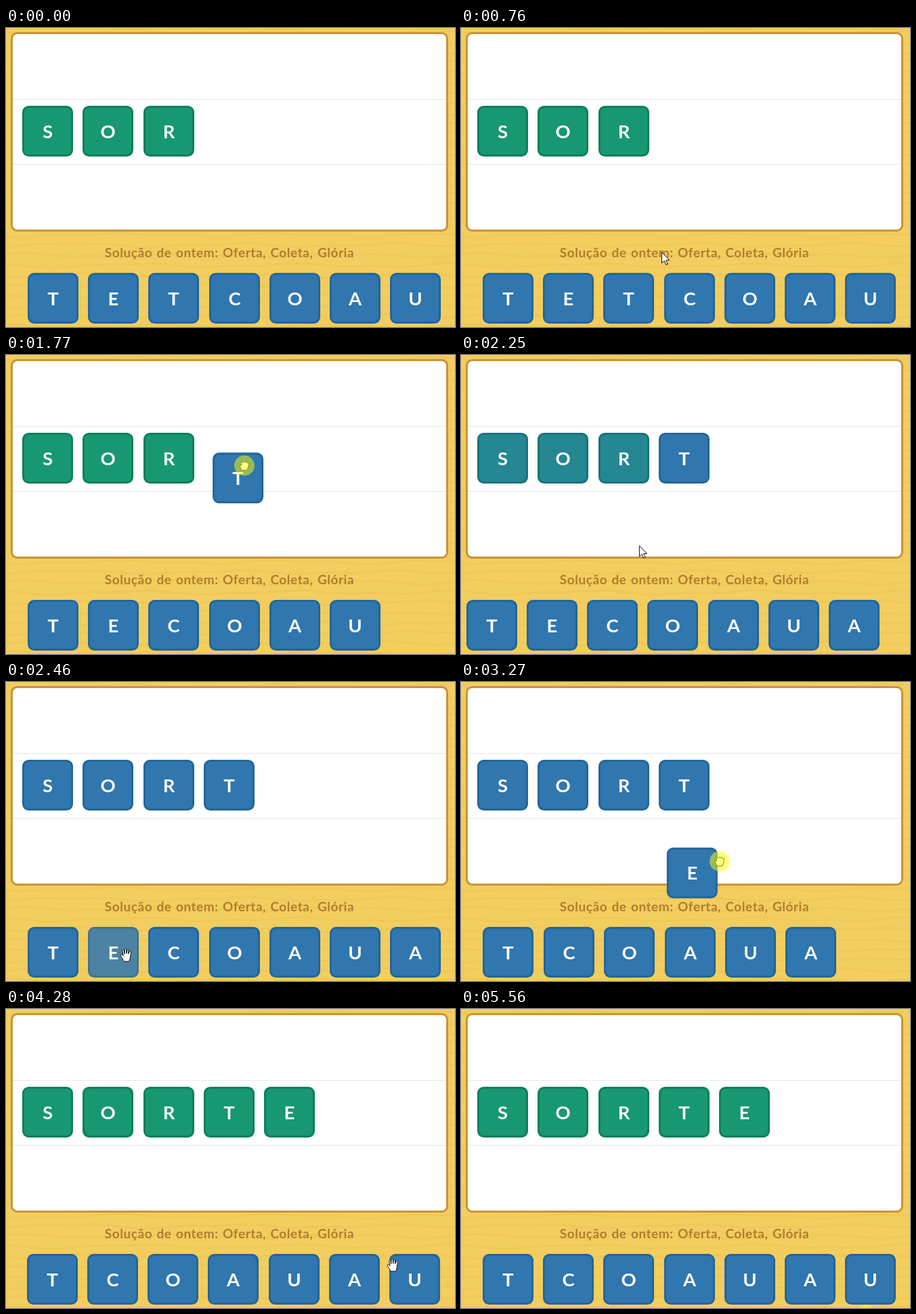
An HTML page that plays this animation: 663x442 px, repeating every 5.76 s.

```html
<!DOCTYPE html>
<html lang="pt">
<head>
<meta charset="utf-8">
<title>Jogo de palavras</title>
<style>
  html, body { margin: 0; width: 100%; height: 100%; overflow: hidden; background: #f2cd5f; }
  svg { display: block; width: 663px; height: 442px; }
  text { font-family: Lato, "Open Sans", sans-serif; font-weight: 700; text-anchor: middle; }
  .caption { font-size: 19px; letter-spacing: .55px; word-spacing: 1.2px; fill: #b17d2e; }
  .tile rect { stroke-width: 3; }
  .tile text { font-size: 27.5px; fill: #fff; }
  .grain path { fill: none; stroke: #edc455; stroke-width: 3; opacity: .5; }
  .cursor path { fill: #fff; stroke: #111; stroke-linejoin: round; }
</style>
</head>
<body>
<svg viewBox="0 0 663 442">
  <rect width="663" height="442" fill="#f2cd5f"/>
  <g id="grain" class="grain"></g>
  <rect x="8.5" y="7.5" width="643" height="292" rx="8" fill="#fff" stroke="#ca9337" stroke-width="3"/>
  <path d="M10 105.5H650M10 201.5H650" stroke="#e6e6e6"/>
  <text class="caption" x="330" y="338.5">Solução de ontem: Oferta, Coleta, Glória</text>
  <g id="tiles"></g>
  <g id="cursor" class="cursor">
    <path id="arrow" d="M.5 .5V16.5L4.2 13L6.8 19L9.2 18L6.7 12.2H11.7Z"/>
    <path id="open" d="M-4 9C-5 5-9 1.5-8.5-.5C-8-2-6-1-4.8 1L-6-6C-6-8-4-8-3.7-6L-3-2L-2.7-8C-2.6-10-.5-10-.4-8L-.2-2.5L.8-7.5C1.2-9.2 3-8.8 2.8-7L2.6-2L4.4-5.3C5.2-6.8 7-6 6.5-4.3L5.3 4L4 9Z"/>
    <path id="closed" d="M-4 7L-6 2.5C-8-1-5.5-2-4.5 0L-5-3C-5-6-2.5-6-2-4.5C-1.5-7 1-7 1.2-4.8C2-6.5 4-6 4.2-4C5.5-5 7-4 6.5-2L5 4L4 7Z"/>
    <circle id="press" r="15" fill="#ff0" fill-opacity=".5"/>
  </g>
</svg>
<script>
const LOOP = 5760, SIZE = 75, GAP = 89.25, PACE = 70;
const TRAY = { x: 31.9, y: 362 }, ROW = { x: 24, y: 115 };
const BLUE = [[48, 118, 175], [35, 102, 154]];
const GREEN = [[23, 152, 114], [14, 127, 92]];
const $ = id => document.getElementById(id);

const ramp = (t, start, length) => Math.min(1, Math.max(0, (t - start) / length));
const easeOut = (t, start, length) => 1 - (1 - ramp(t, start, length)) ** 2;
const mix = (a, b, k) => a + (b - a) * k;
const blend = (a, b, k) => `rgb(${a.map((v, i) => Math.round(mix(v, b[i], k)))})`;

// Pointer gestures: each curves from where the last one ended, bending towards `via`.
const rest = [598, 452];
const gestures = [
  { start: 200, end: 760, via: [480, 400], to: [296, 331] },
  { start: 830, end: 1170, via: [280, 360], to: [251, 393] },
  { start: 1500, end: 1770, via: [346, 172], to: [352, 163.5] },
  { start: 1900, end: 2060, via: [346, 157], to: [341, 152] },
  { start: 2120, end: 2460, via: [200, 390], to: [178, 404] },
  { start: 3060, end: 3270, via: [356, 303], to: [382, 265] },
  { start: 3330, end: 3620, via: [425, 215], to: [440, 186] },
  { start: 3690, end: 4200, via: [445, 110], to: [560, 355] },
  { start: 4280, end: 4770, via: [611, 457], to: rest }
];
gestures.forEach((g, i) => {
  const prev = gestures[i - 1] || { end: 0, to: rest };
  g.step = (g.end - g.start) / Math.round((g.end - g.start) / PACE);
  g.lead = Math.max(prev.end, g.start - g.step);
  g.from = prev.to;
});

// The picture refreshes in even steps within a gesture and rests in between.
function tick(t) {
  const g = gestures.findLast(g => g.start <= t);
  return g ? Math.min(g.end, g.start + Math.floor((t - g.start) / g.step + 1e-6) * g.step) : 0;
}

function pointer(t) {
  const g = gestures.findLast(g => g.lead < t);
  if (!g) return rest;
  const u = ramp(t, g.lead, g.end - g.lead);
  return g.to.map((end, i) => mix(mix(g.from[i], g.via[i], u), mix(g.via[i], end, u), u));
}

function svg(name, attrs, parent) {
  const el = document.createElementNS("http://www.w3.org/2000/svg", name);
  for (const key in attrs) el.setAttribute(key, attrs[key]);
  return parent.appendChild(el);
}

for (let i = 0; i < 30; i++) {
  let d = "";
  for (let x = -5; x <= 670; x += 15) {
    const y = 6 + i * 15 + 2.2 * Math.sin(x / 38 + i * 1.9) + 1.2 * Math.sin(x / 17 + i);
    d += (d ? "L" : "M") + x + " " + y.toFixed(1);
  }
  svg("path", { d }, $("grain"));
}

function makeTile(letter) {
  const g = svg("g", { class: "tile" }, $("tiles"));
  const rect = svg("rect", { x: 1.5, y: 1.5, width: SIZE - 3, height: SIZE - 3, rx: 8 }, g);
  svg("text", { x: SIZE / 2, y: 47.5 }, g).textContent = letter;
  return { g, rect, x: 0, y: 0 };
}
const row = [..."SOR"].map(makeTile);
const tray = [..."TETCOAUAU"].map(makeTile);

// `index` is the tile's place in the tray, `slot` its place in the row.
const drags = [
  { index: 2, slot: 3, grab: [41, 31], press: 1320, start: 1500, drop: 1850, release: 1980, refill: 2180 },
  { index: 1, slot: 4, grab: [57, 42], press: 2730, start: 3060, drop: 3690, release: 3836, refill: 4085 }
];
drags.forEach(d => $("tiles").append(tray[d.index].g));

function place(tile, x, y, green, opacity = 1) {
  Object.assign(tile, { x, y });
  tile.g.setAttribute("transform", `translate(${x} ${y})`);
  tile.g.setAttribute("opacity", opacity);
  tile.rect.setAttribute("fill", blend(BLUE[0], GREEN[0], green));
  tile.rect.setAttribute("stroke", blend(BLUE[1], GREEN[1], green));
}
const slotX = (line, slot) => Math.round(line.x + slot * GAP);
const inside = ([x, y], tile) =>
  x >= tile.x && x < tile.x + SIZE && y >= tile.y && y < tile.y + SIZE;
const show = (el, on) => el.setAttribute("visibility", on ? "visible" : "hidden");

function draw(time) {
  const t = tick(time), at = pointer(t);
  const solved = ramp(t, 3980, 146);
  const green = 1 - ramp(t, 2120, 136) + solved;
  row.forEach((tile, i) => place(tile, slotX(ROW, i), ROW.y, green));

  let slide = 0;
  for (const d of drags)
    if (t >= d.refill) slide -= 26 * (1 - easeOut(t, d.refill, 250));
  const dragging = drags.some(d => t >= d.start && t < d.release);

  tray.forEach((tile, i) => {
    const drag = drags.find(d => d.index === i);
    if (drag && t >= drag.start) {
      // A dragged tile trails the pointer by one step, then settles into its slot.
      const [x, y] = pointer(t - PACE + 3);
      const k = easeOut(t, drag.drop, 200);
      place(tile, mix(x - drag.grab[0], slotX(ROW, drag.slot), k),
        mix(y - drag.grab[1], ROW.y, k), solved);
      return;
    }
    const slot = drags.reduce((s, d) => s - (i > d.index) * easeOut(t, d.start, 235), i);
    tile.x = slotX(TRAY, slot + slide / GAP);
    tile.y = TRAY.y;
    const hover = !dragging && inside(pointer(t - 60), tile);
    place(tile, tile.x, tile.y, 0, hover ? .85 : 1);
  });
  drags.forEach((d, i) => show(tray[7 + i].g, t >= d.refill));

  const pressed = time >= 5560 || drags.some(d => time >= d.press && time < d.release);
  const over = [...row, ...tray].some(tile => inside(at, tile));
  $("cursor").setAttribute("transform", `translate(${at})`);
  show($("arrow"), !over && !pressed);
  show($("open"), over && !pressed);
  show($("closed"), pressed);
  show($("press"), pressed);
}

const begin = performance.now();
function frame() {
  draw(Math.max(0, performance.now() - begin) % LOOP);
  requestAnimationFrame(frame);
}
frame();
</script>
</body>
</html>
```
